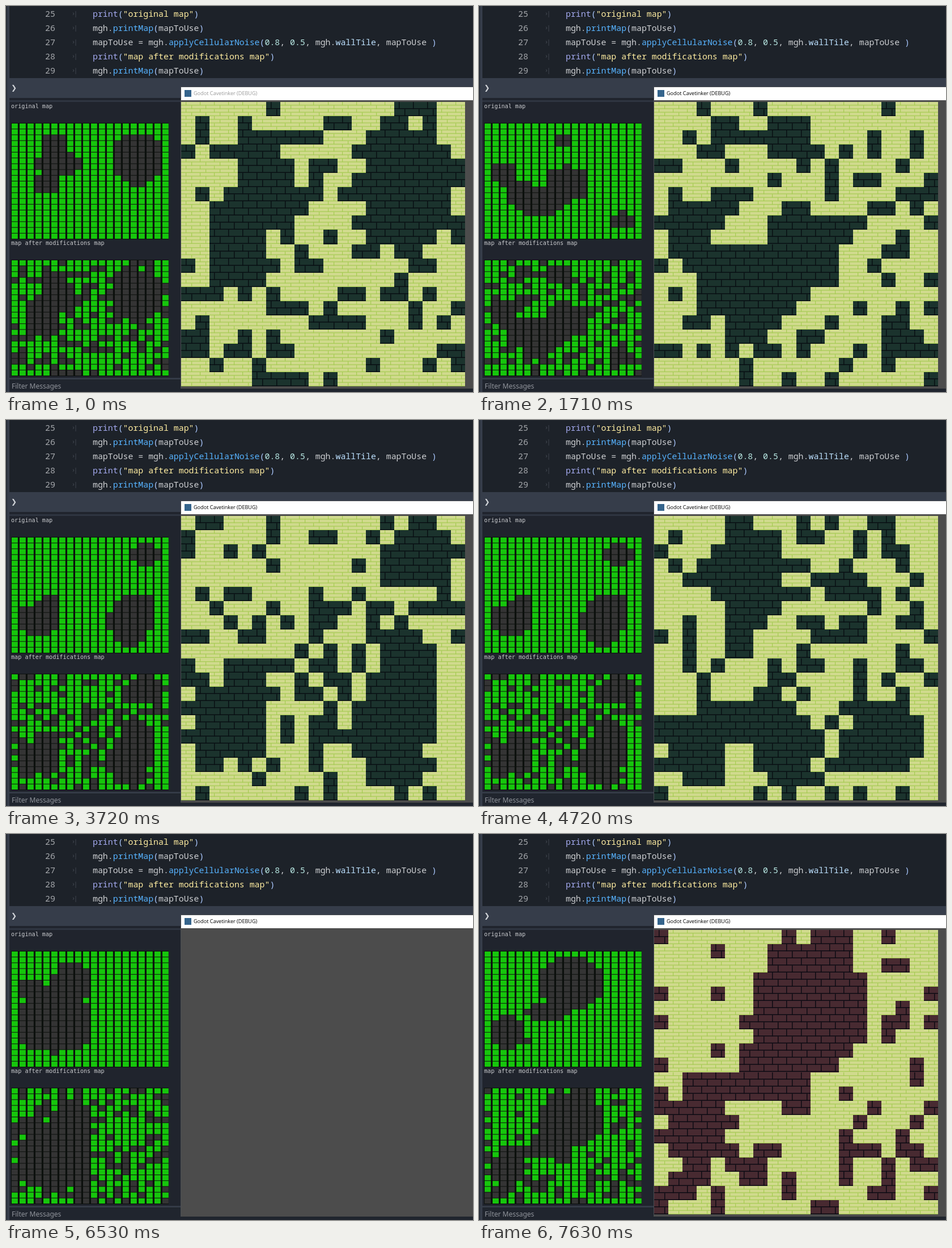
An HTML page with a canvas that plays this animation: 824 px wide and 680 px high, repeating every 8.63 s.

```html
<!DOCTYPE html>
<html lang="en">
<head>
<meta charset="utf-8">
<title>Cave map generator</title>
<style>
  html, body { margin: 0; width: 100%; height: 100%; overflow: hidden; background: #1d2229; }
  canvas { position: absolute; left: 0; top: 0; }
  .t { position: absolute; white-space: pre; line-height: 20px; }
  .code { font: 14.88px/20px "Noto Sans Mono", monospace; color: #cdcfd2; }
  .out { font: 10.15px/20px "DejaVu Sans Mono", monospace; color: #c9cbce; left: 9px; }
  .num { left: 69px; color: #a4a7ab; }
  .tab { left: 116px; color: #4b515a; font-size: 10px; letter-spacing: -2px; }
  .src { left: 153px; }
  .g { color: #a3a9ee; } .f { color: #57b3ff; } .s { color: #ffeda1; }
  .p { color: #abc9ff; } .m { color: #bce0ff; } .n { color: #b9e9e4; }
  #title { left: 331px; top: 144px; font: 9.1px/20px "Open Sans", sans-serif; }
  #filter { left: 10px; top: 660px; font: 12px/20px "Noto Sans", sans-serif; color: #91959c; }
  #prompt { left: 9px; top: 134px; font: 12px/20px "DejaVu Sans", sans-serif; color: #d3d6da; }
</style>
</head>
<body>
<canvas id="stage" width="824" height="680"></canvas>
<div id="code"></div>
<div class="t" id="prompt">❯</div>
<div class="t out" style="top:167px">original map</div>
<div class="t out" style="top:408px">map after modifications map</div>
<div class="t" id="filter">Filter Messages</div>
<div class="t" id="title">Godot Cavetinker (DEBUG)</div>
<script>
const LOOP = 8630, SIZE = 20, TILE = 25.05;
const ctx = document.getElementById('stage').getContext('2d');
const title = document.getElementById('title');

const span = (cls, s) => `<span class="${cls}">${s}</span>`;
const call = name => 'mgh.' + span('f', name) + span('p', '(');
const end = span('p', ')');
const printText = s => span('g', 'print') + span('p', '(') + span('s', `"${s}"`) + end;
const printMap = call('printMap') + 'mapToUse' + end;
const lines = [
  printText('original map'),
  printMap,
  'mapToUse = ' + call('applyCellularNoise') + span('n', '0.8') + ', ' + span('n', '0.5') +
    ', mgh.' + span('m', 'wallTile') + ', mapToUse ' + end,
  printText('map after modifications map'),
  printMap
];
document.getElementById('code').innerHTML = lines.map((s, i) => {
  const at = `style="top:${3 + 25 * i}px"`;
  return `<div class="t code num" ${at}>${25 + i}</div>` +
    `<div class="t code tab" ${at}>›|</div><div class="t code src" ${at}>${s}</div>`;
}).join('');

const GREEN = ['#1b332d', '#080f13'], MAROON = ['#482a31', '#0c0a13'];
const LIGHT = ['#d0da8d', '#a5ca52'];

// Each run reloads the scene; rooms are ellipses: centre x, y and radii in cells.
const runs = [
  { at: 0, blank: 0, log: 0,
    rooms: [[5.5, 4.5, 1.8, 2.9], [6, 7, 3.1, 2.2], [4.6, 10.2, 1.8, 2], [16, 6.1, 3.1, 4.6]] },
  { at: 600,
    rooms: [[8.5, 2.4, 4.7, 2.2], [11, 6, 2.2, 2.9], [4.5, 3.8, 1.6, 1.6],
            [4.5, 16, 3.7, 4.2], [12.5, 15.6, 1.6, 1.7]] },
  { at: 1500, blank: 0, log: 210,
    rooms: [[10, 3, 1.1, 1.1], [2.5, 8.7, 1.7, 1.9], [4.5, 11.5, 1.6, 1.8],
            [7, 13.5, 3.6, 2.6], [10.5, 10.5, 2.8, 3], [17.5, 16.9, 1.7, 1.6]] },
  { at: 2710 },
  { at: 3620, log: 100,
    rooms: [[17, 3, 2.1, 2.1], [3.4, 14.4, 2.6, 2.8], [4.8, 11.5, 1.4, 1.8],
            [15, 14.5, 2.7, 4.4], [16, 11.5, 2.2, 2]] },
  { at: 4620,
    rooms: [[6.6, 4.5, 2.4, 3.7], [14.2, 4.7, 1.1, 0.9], [3, 16, 2.2, 2.1],
            [9, 16, 1.8, 3], [16, 15.6, 2.7, 2.7]] },
  { at: 5620,
    rooms: [[7.8, 5.5, 2.5, 3.6], [2.8, 6.8, 1.9, 1.9], [5.5, 12, 4.5, 5.6],
            [5.5, 15.5, 4.6, 1.9]] },
  { at: 6530 },
  { at: 7430, dark: MAROON,
    rooms: [[10.9, 5.5, 4, 4.7], [8, 10.5, 2.8, 1.7], [3, 14, 2.3, 2.8], [4.8, 15.3, 1.3, 0.9]] }
];

function random(seed) {
  return () => {
    seed = seed + 0x6D2B79F5 | 0;
    let v = Math.imul(seed ^ seed >>> 15, 1 | seed);
    v = v + Math.imul(v ^ v >>> 7, 61 | v) ^ v;
    return ((v ^ v >>> 14) >>> 0) / 4294967296;
  };
}

const randomRooms = rnd => [0, 1, 2].map(i =>
  [3 + 6.5 * i + 2 * rnd(), 4 + 12 * rnd(), 2 + 1.5 * rnd(), 2 + 2 * rnd()]);

// Noise opens walls at random, most often next to a room.
function build(run, index) {
  const rnd = random(37 * index + 11);
  const rooms = run.rooms || randomRooms(rnd);
  const before = [], after = [];
  for (let r = 0; r < SIZE; r++) {
    before.push([]);
    after.push([]);
    for (let c = 0; c < SIZE; c++) {
      const dist = Math.min(...rooms.map(([x, y, rx, ry]) =>
        (Math.hypot((c + 0.5 - x) / rx, (r + 0.5 - y) / ry) - 1) * Math.min(rx, ry)));
      const chance = dist < 0.8 ? 0.5 : 0.28;
      const wall = dist > 0;
      before[r].push(wall);
      after[r].push(wall && rnd() > chance);
    }
  }
  return { blank: 100, log: 200, dark: GREEN, ...run, before, after };
}

const maps = runs.map(build);

function box(color, x, y, w, h) {
  ctx.fillStyle = color;
  ctx.fillRect(x, y, w, h);
}

function eachCell(grid, draw) {
  grid.forEach((row, r) => row.forEach((wall, c) => draw(c, r, wall)));
}

function drawTile(c, r, wall, dark) {
  const x = Math.round(309 + c * TILE), y = Math.round(169 + r * TILE);
  const w = Math.round(309 + (c + 1) * TILE) - x, h = Math.round(169 + (r + 1) * TILE) - y;
  const [face, joint] = wall ? LIGHT : dark;
  box(face, x, y, w, h);
  const courses = wall ? 4 : 2, step = 25 / courses, line = wall ? 1.2 : 1.5;
  for (let i = 0; i < courses; i++) {
    box(joint, x, y + (i + 1) * step - line, w, line);
    box(joint, x + (i % 2 ? 18 : 8), y + i * step, line, step);
  }
}

function drawLog(grid, top) {
  box('#0c100d', 9, top - 1, 278, 205);
  eachCell(grid, (c, r, wall) =>
    box(wall ? '#16c60c' : '#343434', 10 + 14 * c, top + 10.2 * r, 10.8, 9.2));
}

function drawFrame() {
  box('#1d2229', 0, 0, 824, 680);
  box('#363d4a', 0, 127, 824, 35);
  box('#20242d', 0, 162, 824, 4);
  box('#2f3541', 5, 166, 304, 3);
  box('#20242d', 5, 169, 304, 487);
  box('#343b47', 5, 655, 304, 3);
  box('#20252e', 5, 659, 819, 21);
  box('#252b35', 0, 0, 2, 680);
  box('#363d4a', 2, 0, 4, 680);
  box('#4a4d52', 308, 142, 516, 532);
  box('#ffffff', 309, 143, 515, 23);
  box('#4c4c4c', 309, 166, 515, 508);
  box('#35648c', 315, 148, 12, 12);
}

const start = performance.now();
let last = '';

function tick() {
  const t = (performance.now() - start) % LOOP;
  const game = maps.findLast(m => t >= m.at);
  const log = maps.findLast(m => t >= m.at + m.log);
  const loaded = t >= game.at + game.blank;
  const state = [game.at, log.at, loaded].join();
  title.style.color = t < 200 ? '#999999' : '#000000';
  if (state !== last) {
    last = state;
    drawFrame();
    drawLog(log.before, 207);
    drawLog(log.after, 448);
    if (loaded) eachCell(game.after, (c, r, wall) => drawTile(c, r, wall, game.dark));
  }
  requestAnimationFrame(tick);
}
tick();
</script>
</body>
</html>
```
